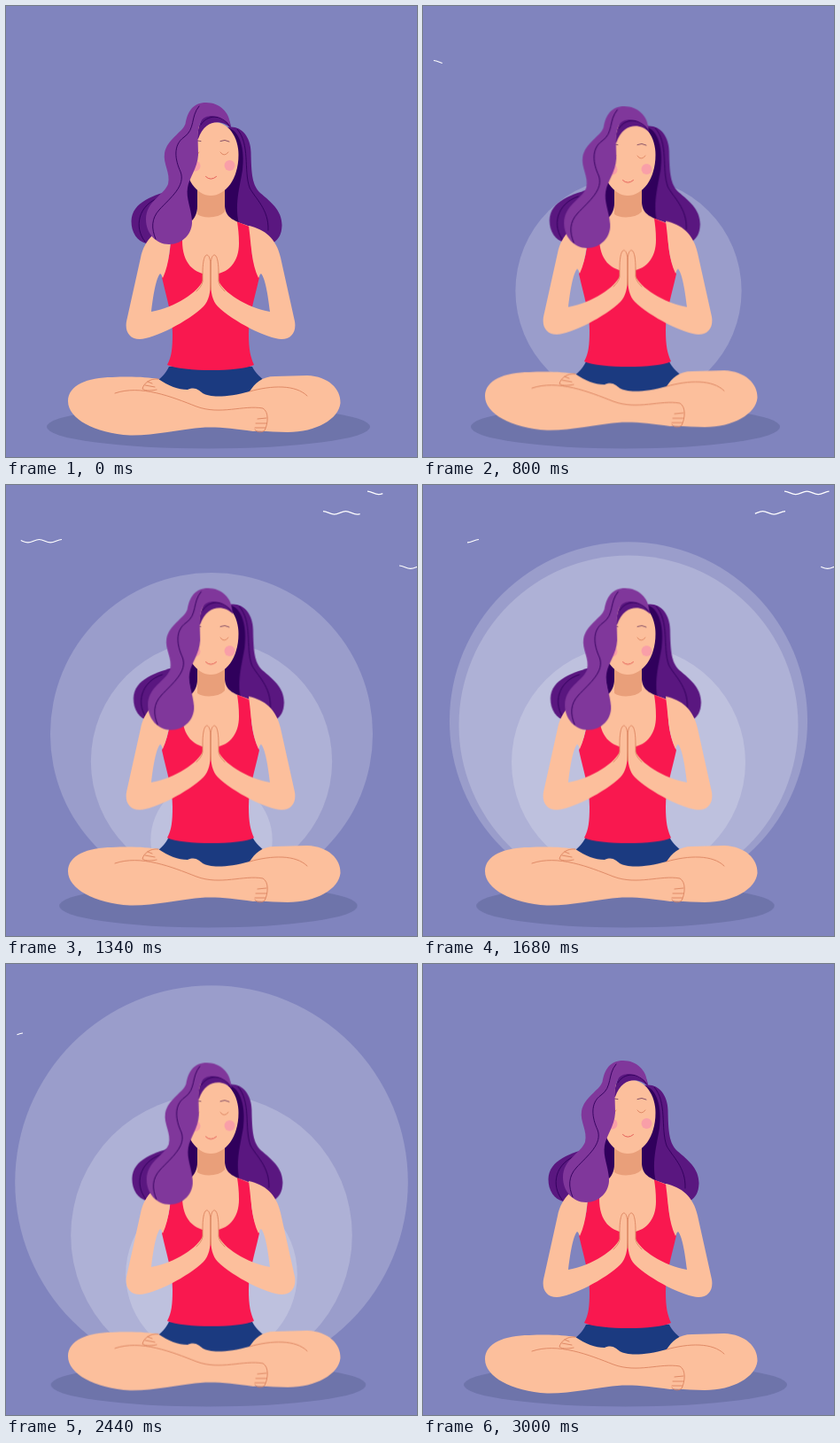
These frames come from a looping animation (464 by 509 pixels, 3.02 s). An HTML page:

```html
<!DOCTYPE html>
<html lang="en">
<head>
<meta charset="utf-8">
<title>Breathing meditation</title>
<style>
  html, body { margin: 0; width: 100%; height: 100%; overflow: hidden; background: #8084be; }
  svg { display: block; width: 464px; height: 509px; }

  /* One breath: half a cycle up, half a cycle down */
  .breathe { animation: breathe 1510ms cubic-bezier(.37, 0, .63, 1) infinite alternate; }
  @keyframes breathe { to { transform: translate(var(--x, 0px), var(--y, 0px)); } }
  .legs { --y: -10.4px; }
  .torso { --y: -7px; }
  .arms { --y: -9.7px; }
  .back { --x: 2.5px; --y: -2px; }
  .front { --x: 2.3px; --y: 7.7px; }
  .features { --y: 7.5px; }

  .shadow {
    fill: #6e74aa;
    transform-origin: 228.5px 475px;
    animation: narrow 1510ms cubic-bezier(.37, 0, .63, 1) infinite alternate;
  }
  @keyframes narrow { to { transform: scaleX(.92); } }

  /* Halo rings */
  .ring { fill: #fff; fill-opacity: .2; cx: 232px; cy: 440px; r: 0; animation: 3020ms linear infinite; }
  .outer { animation-name: outer; }
  .middle { animation-name: middle; }
  .inner { animation-name: inner; }
  @keyframes outer {
    0%, 6.5% { r: 0px; cy: 440px; }
    16% { r: 68px; cy: 385px; }
    26.49% { r: 127.5px; cy: 321.5px; }
    35% { r: 160px; cy: 297px; }
    44.37% { r: 182px; cy: 281px; }
    55.63% { r: 202px; cy: 266.5px; }
    66.23% { r: 227.5px; cy: 240.5px; }
    72% { r: 230px; cy: 239px; }
    80.79% { r: 222px; cy: 246px; }
    89.4% { r: 181px; cy: 284px; }
    99%, 100% { r: 0px; cy: 440px; }
  }
  @keyframes middle {
    0%, 23% { r: 0px; cy: 440px; }
    33% { r: 68px; cy: 390px; }
    44.37% { r: 136px; cy: 312px; }
    55.63% { r: 191.5px; cy: 271px; }
    60% { r: 195px; cy: 269px; }
    66.23% { r: 188px; cy: 275.5px; }
    80.79% { r: 159px; cy: 306px; }
    89.4% { r: 118px; cy: 338px; }
    98%, 100% { r: 0px; cy: 440px; }
  }
  @keyframes inner {
    0%, 34% { r: 0px; cy: 440px; }
    44.37% { r: 68.5px; cy: 401px; }
    55.63% { r: 132px; cy: 313px; }
    58% { r: 133px; cy: 313px; }
    66.23% { r: 124px; cy: 324px; }
    80.79% { r: 97px; cy: 350px; }
    89.4% { r: 62px; cy: 390px; }
    97%, 100% { r: 0px; cy: 440px; }
  }

  /* Breeze lines draw on from the left, then wipe off the same way */
  .breeze use {
    fill: none; stroke: #fff; stroke-width: 1.2;
    stroke-dasharray: 100 400; stroke-dashoffset: 101;
    animation: trim 3020ms linear var(--at) infinite backwards;
  }
  @keyframes trim {
    0% { stroke-dashoffset: 101; }
    17.4%, 19.8% { stroke-dashoffset: 0; }
    37.2%, 100% { stroke-dashoffset: -101; }
  }

  .skin { fill: #fcbf9c; }
  .line { fill: none; stroke: #dc8460; stroke-width: .9; stroke-linecap: round; }
  .strand { fill: none; stroke: #30005c; stroke-width: .9; stroke-linecap: round; }
  .brow { fill: none; stroke: #7a4560; stroke-width: .9; stroke-linecap: round; }
  .smile { fill: none; stroke: #e4605a; stroke-linecap: round; }
  .dark { fill: #30005c; }
  .plum { fill: #5a1780; }
  .violet { fill: #80379b; }
  .blush { fill: #f99fa8; }
</style>
</head>
<body>
<svg viewBox="0 0 464 509">
  <defs>
    <path id="wave" pathLength="100" d="M0 0c5 0 7.7 3.4 12.7 3.4s7.8-3.4 12.8-3.4 7.7 3.4 12.7 3.4 7.8-3.4 12.8-3.4"/>
    <g id="arm">
      <path class="skin" d="M274 248C292 252 305 262 310 284L326 356C328 368 322 376 311 376C296 376 256 356 239 339C233 333 231 323 231 310V290C231 284 233 281 235.500 281C239 282 240 292 240 302V310C244 322 272 341 298 345C296 328 293 308 288 302C286 303 286 306 285 307C277 290 277 270 274 248Z"/>
      <path class="line" d="M231.300 320V291C231.300 285 233 281 235.500 281C239 282 240 292 240 302V311C241 316 244 319 247 322"/>
    </g>
  </defs>

  <rect width="464" height="509" fill="#8084be"/>

  <g class="breeze">
    <use href="#wave" x="12" y="61.500" style="--at:695ms"/>
    <use href="#wave" x="358" y="29.700" style="--at:912ms"/>
    <use href="#wave" x="444" y="91" style="--at:1030ms"/>
    <use href="#wave" x="408" y="7.200" style="--at:1160ms"/>
    <use href="#wave" x="-32" y="78" style="--at:1390ms"/>
  </g>

  <circle class="ring outer"/>
  <circle class="ring middle"/>
  <circle class="ring inner"/>
  <ellipse class="shadow" cx="228.500" cy="475" rx="182.500" ry="24.500"/>

  <g class="breathe back">
    <path class="plum" d="M250 137C264 134 276 146 276.500 165C277 190 278 202 287 211C299 221 312 231 311.500 248C311 258 308 263 302 267L262 250L240 200Z"/>
    <path class="plum" d="M190 207C168 213 141.500 221 141.500 243C141.500 256 148 265 158 268L205 262Z"/>
    <path class="dark" d="M252 138C264 142 270 162 267 185C264 205 257 225 264 250H210C204 232 200 210 203 180Z"/>
    <path class="strand" d="M261 139C276 156 268 185 275 205C281 217 297 229 296 253M157 266C144 250 149 224 174 216"/>
  </g>

  <g class="breathe legs">
    <path fill="#1b3a80" d="M184 407H278C281 413 285 417 293 424L270 446H205L170 424C178 417 181 413 184 407Z"/>
  </g>

  <path class="skin" d="M216 200H247V240H216Z"/>
  <g class="breathe torso">
    <path class="skin" d="M216 215H247V226C248 239 257 243 277 249V310H186V256C205 248 216 242 216 226Z"/>
  </g>
  <path fill="#e99f7a" d="M216 205H247V232C240 240 222 240 216 235Z"/>
  <g class="breathe torso">
    <path fill="#f9184f" d="M261 243.500L276 249.500C277 270 276 285 286 306C280 333 274 350 274 370C274 388 276 396 280 405C264 413 200 413 182 405C187 396 188 386 188 370C188 350 182 333 176 306C186 285 186 270 186 252L199 246V265C199 290 212 303 231 303C252 303 263 288 263 268C263 258 262 250 261 243.500Z"/>
  </g>

  <g class="breathe legs">
    <path class="skin" d="M70 446C70 428 92 419 120 419C142 418 160 419 172 421C184 429 194 433 205 433C214 429 218 434 222 437C230 442 250 442 275 435C281 426 288 418 304 418L340 417C364 418 378 432 377.500 448C376 466 350 481 318 481C305 481 290 479 279 480C258 477 242 475 225 475.500C192 478 168 485 140 484.500C100 482 70 466 70 446Z"/>
    <path class="line" d="M123 437C152 427 187 441 215 452C242 462 268 450 290 454C297 458 296 471 292 479C288 482 283 481 281 478M284 466L294 465M282 471L294 471M281 476L293 476"/>
    <path class="line" d="M275 435C300 428 327 427 340 440"/>
    <path class="line" d="M172 421C163 420 156 425 154 432C158 435 165 434 170 433M157 428L168 430M160 424L165 426"/>
  </g>

  <g class="breathe arms">
    <use href="#arm"/>
    <use href="#arm" transform="translate(462) scale(-1 1)"/>
  </g>

  <path class="skin" d="M201 167C201 146 214 131 235 131C251 131 262.500 148 262.500 168C262.500 195 248 214 231 214C216 214 201 196 201 167Z"/>
  <g class="breathe features">
    <circle class="blush" cx="252.500" cy="180" r="6"/>
    <circle class="blush" cx="213.500" cy="180.500" r="6"/>
    <path class="brow" d="M242 152.500Q247 150 252 153M212 153Q216 151 220 152.500"/>
    <path class="line" d="M242 165Q246 171 251 165M211 165Q215 171 218 165"/>
    <path class="smile" d="M225.500 192.500Q231 198 237.500 192.500"/>
  </g>

  <g class="breathe front">
    <path class="plum" d="M216 150C217 122 231 115 242 120C250 124 254 131 254 138C244 128 225 127 217 150Z"/>
    <path class="strand" d="M220 134C227 122 244 122 252 135"/>
    <path class="violet" d="M253 135C253 120 241 109 226 109C211 109 205 119 202.500 133C199 143 182 150 179 166C177 178 186 188 183 201C178 214 158 220 158 241C158 256 169 269 184 269C199 269 211 257 210 242C209 228 203 217 205 205C207 193 216 184 217 168C217 152 215 139 220 130C226 121 243 122 253 135Z"/>
    <path class="strand" d="M218 113C208 125 214 139 201 148C188 157 191 174 197 187C203 203 186 216 173 230C164 240 164 251 169 263"/>
  </g>
</svg>
</body>
</html>
```
